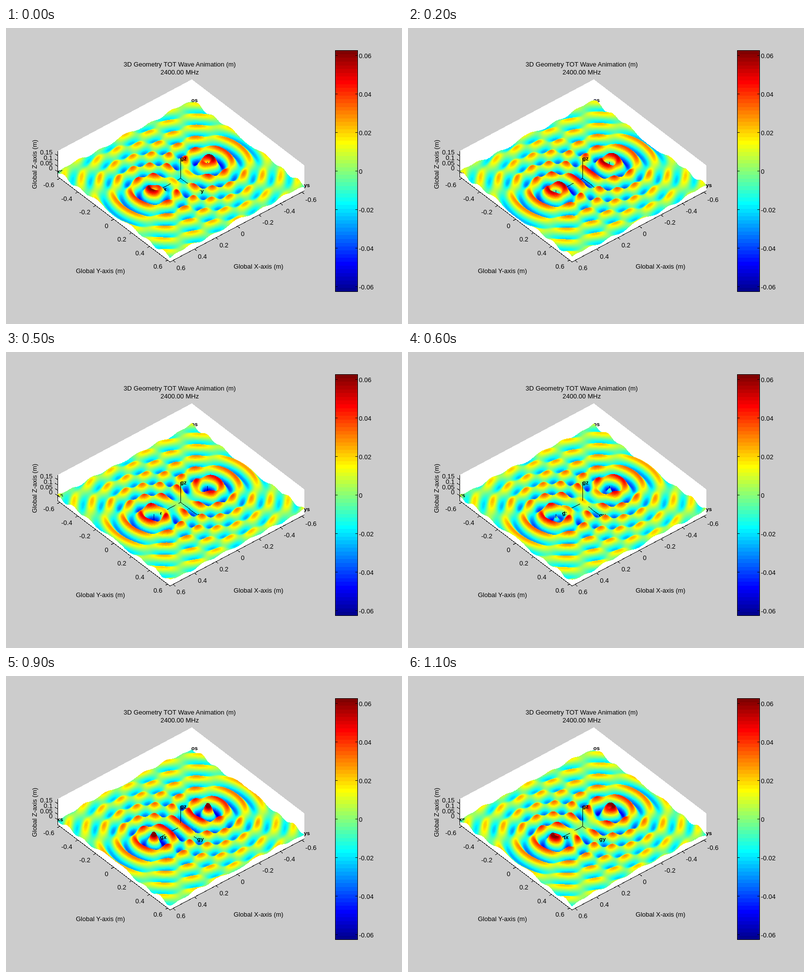
Animation of 799 by 599 pixels, one loop 1.2 s. Source, as an HTML page with a canvas:

```html
<!DOCTYPE html>
<html lang="en">
<head>
<meta charset="utf-8">
<title>3D Geometry Wave Animation</title>
<style>
  html, body { margin: 0; width: 100%; height: 100%; overflow: hidden; background: #ccc; }
  svg, canvas { position: absolute; left: 0; top: 0; display: block; }
  text { font: 13px "Liberation Sans", Arial, sans-serif; fill: #000; }
  .lines { stroke: #000; fill: none; shape-rendering: crispEdges; }
</style>
</head>
<body>
<svg id="chart" width="799" height="599" viewBox="0 0 799 599">
  <polygon points="104,249 375,104 602,278 602,329 331,473 104,301" fill="#fff" shape-rendering="crispEdges"/>
  <path class="lines" d="M104.5 249V301L331 473.5L602 329.5"/>
  <g id="bar" shape-rendering="crispEdges"></g>
  <path id="ticks" class="lines"/>
  <g text-anchor="middle">
    <text x="350.5" y="78">3D Geometry TOT Wave Animation (m)</text>
    <text x="350.5" y="94">2400.00 MHz</text>
    <text x="190.5" y="496">Global Y-axis (m)</text>
    <text x="509.5" y="487">Global X-axis (m)</text>
    <text transform="translate(62 276) rotate(-90)">Global Z-axis (m)</text>
  </g>
</svg>
<canvas id="stage" width="799" height="599"></canvas>
<script>
const W = 799, H = 599, FRAMES = 12, STEP = 100;
const LAMBDA = 0.125, K = 2 * Math.PI / LAMBDA;
const HALF = 0.625, PEAK = 0.0625, FLOOR = -0.0485, AXIS = 0.1875, SOURCE = 0.25;

// Orthographic projection: screen vectors of the x, y and z axes
const CX = 353, CY = 304.4;
const XX = -216.8, XY = 115.2, YX = 181.6, YY = 137.6, ZY = 217;
const DET = XX * YY - YX * XY;
const project = (x, y, z) => [CX + XX * x + YX * y, CY + XY * x + YY * y - ZY * z];

const clamp = v => Math.max(0, Math.min(1, v));
const JET = Array.from({ length: 64 }, (_, i) => {
  const v = 4 * (i + 1) / 64;
  const ramp = mid => Math.round(255 * clamp(1.5 - Math.abs(v - mid)));
  return [ramp(3), ramp(2), ramp(1)];
});
const jet = z => JET[Math.max(0, Math.min(63, Math.floor((z / PEAK + 1) * 32)))];

function wave(r, phase) {
  const amp = 0.0088 / (r + 0.146) + 0.012 * Math.exp(-((r / 0.03) ** 2));
  return amp * Math.cos(K * Math.sqrt(r * r + 0.000144) - phase);
}
const height = (x, y, phase) =>
  wave(Math.hypot(x - SOURCE, y), phase) + wave(Math.hypot(x + SOURCE, y), phase);

// ---- Axes, ticks and colour bar ----
function drawChart() {
  const svg = document.getElementById("chart"), bar = document.getElementById("bar");
  const NS = "http://www.w3.org/2000/svg";
  let path = "";
  const add = (parent, tag, attrs, text = "") => {
    const el = document.createElementNS(NS, tag);
    for (const key in attrs) el.setAttribute(key, attrs[key]);
    el.textContent = text;
    parent.append(el);
  };
  const tick = (x, y, dx, dy) => { path += `M${x} ${y}l${dx} ${dy}`; };
  const label = (x, y, text, anchor) => add(svg, "text", { x, y: y + 5, "text-anchor": anchor }, text);

  for (let i = -3; i <= 3; i++) {
    const v = i / 5, text = i ? v.toFixed(1) : "0";
    const [ax, ay] = project(HALF, v, FLOOR);
    tick(ax, ay, -5, 2.7);
    label(ax - 11, ay + 13, text, "end");
    const [bx, by] = project(v, HALF, FLOOR);
    tick(bx, by, 5, 3.8);
    label(bx + 7.5, by + 15, text, "start");
  }
  for (const text of ["0", "0.05", "0.1", "0.15"]) {
    const [x, y] = project(HALF, -HALF, +text);
    tick(x, y, -5, -3);
    label(94, y - 7, text, "end");
  }

  const top = 45, tall = 489;
  JET.forEach((c, i) => {
    const y = Math.round(top + tall * (63 - i) / 64), end = Math.round(top + tall * (64 - i) / 64);
    add(bar, "rect", { x: 664, y, width: 46, height: end - y, fill: `rgb(${c})` });
  });
  path += "M664.5 45.5H709.5V533.5H664.5Z";
  for (let i = -3; i <= 3; i++) {
    const y = Math.round(289 - 78 * i) + 0.5;
    tick(664, y, 5, 0);
    tick(710, y, -5, 0);
    label(712, y, i ? (i / 50).toFixed(2) : "0", "start");
  }
  document.getElementById("ticks").setAttribute("d", path);
}

// ---- Lines and labels that the surface can hide ----
function makeOverlay() {
  const dots = [];

  function line(from, to, color) {
    const [x0, y0] = project(...from), [x1, y1] = project(...to);
    const g0 = project(from[0], from[1], 0)[1], g1 = project(to[0], to[1], 0)[1];
    const n = Math.ceil(Math.max(Math.abs(x1 - x0), Math.abs(y1 - y0)));
    for (let i = 0; i <= n; i++) {
      const t = i / n;
      const px = Math.floor(x0 + (x1 - x0) * t - 0.5), py = Math.floor(y0 + (y1 - y0) * t);
      dots.push({ at: py * W + px, alpha: 1, ground: g0 + (g1 - g0) * t, color });
    }
  }

  const pad = document.createElement("canvas");
  pad.width = 24;
  pad.height = 20;
  const pen = pad.getContext("2d", { willReadFrequently: true });
  pen.font = 'bold 11px "Liberation Sans", Arial, sans-serif';
  pen.textBaseline = "middle";

  function label(text, x, y, z) {
    const [sx, sy] = project(x, y, z), ground = project(x, y, 0)[1];
    const left = Math.round(sx) - 2, top = Math.round(sy) - 10;
    pen.clearRect(0, 0, 24, 20);
    pen.fillText(text, 1, 11);
    const data = pen.getImageData(0, 0, 24, 20).data;
    for (let i = 0; i < 480; i++) {
      const alpha = data[i * 4 + 3] / 255;
      if (!alpha) continue;
      const py = top + Math.floor(i / 24);
      // Text faces the viewer, so its depth tilts against the ground
      dots.push({ at: py * W + left + i % 24, alpha, ground: ground + 0.4 * (py - sy), color: [0, 0, 0] });
    }
  }

  const black = [0, 0, 0], navy = [0, 0, 110];
  line([0, 0, 0], [AXIS, 0, 0], black);
  line([0, 0, 0], [0, AXIS, 0], black);
  line([0, 0, 0], [0, 0, AXIS], black);
  for (const x of [SOURCE, -SOURCE]) line([x, 0, -0.031], [x, 0, 0.02], navy);
  label("gx", AXIS, 0, 0);
  label("gy", 0, AXIS, 0);
  label("gz", 0, 0, AXIS);
  label("os", -HALF, -HALF, 0);
  label("xs", HALF, -HALF, 0);
  label("ys", -HALF, HALF, 0);
  return dots;
}

// ---- Surface: each screen column is scanned from front to back ----
function renderFrame(index) {
  const phase = 2 * Math.PI * (index / FRAMES + 1 / 3);
  const img = new ImageData(W, H), px = img.data;
  const depth = new Float32Array(W * H).fill(-1e6);

  for (let sx = 104; sx < 602; sx++) {
    const dx = sx + 0.5 - CX;
    let top = -1;
    for (let g = CY + 159; g > CY - 159; g -= 0.4) {
      const dy = g - CY;
      const x = (dx * YY - YX * dy) / DET, y = (XX * dy - XY * dx) / DET;
      if (Math.abs(x) > HALF || Math.abs(y) > HALF) continue;
      const z = height(x, y, phase);
      const row = Math.ceil(g - ZY * z - 0.5);
      if (top < 0) top = row + 1;
      if (row >= top) continue;
      const c = jet(z);
      while (top > row) {
        const at = --top * W + sx;
        depth[at] = g;
        px.set(c, at * 4);
        px[at * 4 + 3] = 255;
      }
    }
  }

  for (const d of overlay) {
    if (depth[d.at] > d.ground + 0.6) continue;
    const p = d.at * 4, under = px[p + 3] / 255;
    const out = d.alpha + under * (1 - d.alpha);
    for (let i = 0; i < 3; i++)
      px[p + i] = (d.color[i] * d.alpha + px[p + i] * under * (1 - d.alpha)) / out;
    px[p + 3] = out * 255;
  }
  return img;
}

drawChart();
const overlay = makeOverlay();
const frames = Array.from({ length: FRAMES }, (_, i) => renderFrame(i));
const ctx = document.getElementById("stage").getContext("2d");
const start = performance.now();
let shown = -1;

function tickFrame() {
  const i = Math.floor((performance.now() - start) / STEP) % FRAMES;
  if (i !== shown) ctx.putImageData(frames[shown = i], 0, 0);
  requestAnimationFrame(tickFrame);
}
tickFrame();
</script>
</body>
</html>
```
